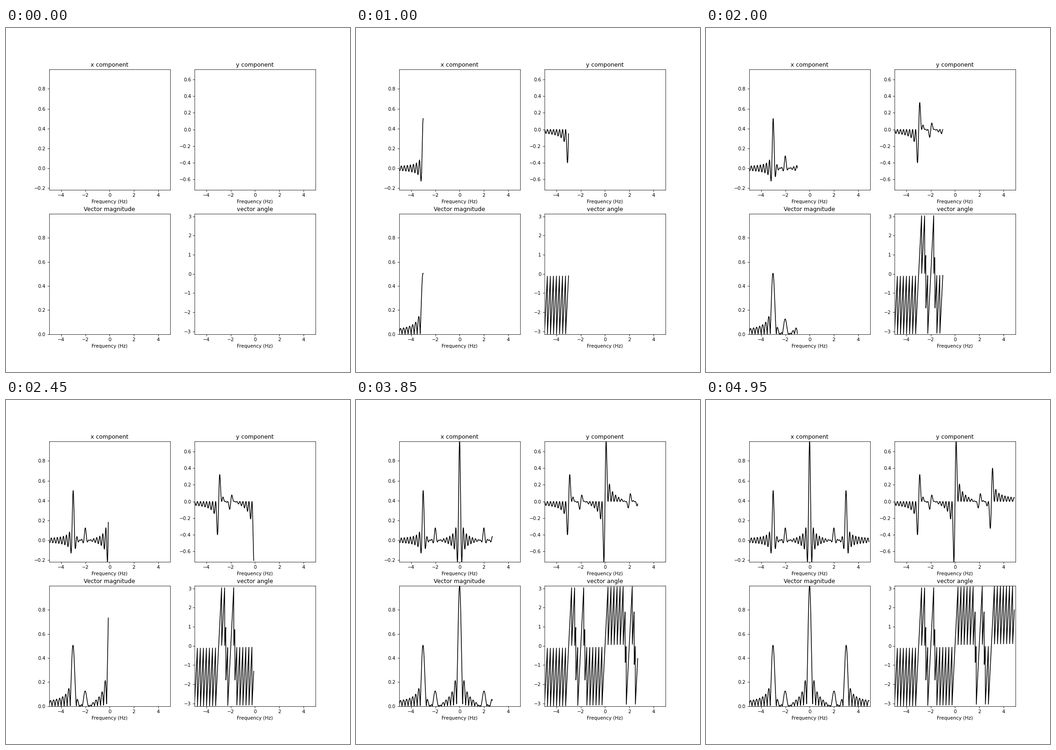
A matplotlib script for the animation above (5000 ms loop, 748 px wide and 748 px high).

```python
import numpy as np
import matplotlib.pyplot as plt
from matplotlib.animation import FuncAnimation

FRAMES = 100
STEP = 10            # samples revealed per frame
DURATION = 4         # length of the signal in seconds
RATE = 4000          # samples per second

freqs = np.linspace(-5, 5, FRAMES * STEP)


def winding(f):
    """Mean of exp(2j*pi*f*t) over the sampled duration."""
    turn = np.exp(2j * np.pi * f * DURATION) - 1
    return turn / (DURATION * RATE * (np.exp(2j * np.pi * f / RATE) - 1))


def cosine(f, f0):
    return (winding(f - f0) + winding(f + f0)) / 2


# centre of mass of 1 + cos(3 Hz) + cos(2 Hz) / 4 wound at every frequency
centre = winding(freqs) + cosine(freqs, 3) + cosine(freqs, 2) / 4
angle = np.angle(centre)
angle[0] = -np.pi    # the vector vanishes at the first frequency


def span(values):
    return values.min(), values.max()


size = np.abs(centre)
panels = [
    ("x component", centre.real, span(centre.real)),
    ("y component", centre.imag, span(centre.imag)),
    ("Vector magnitude", size, (0, size.max())),
    ("vector angle", angle, (-np.pi, np.pi)),
]

fig, axes = plt.subplots(2, 2, figsize=(10, 10), dpi=74.8)
lines = []
for ax, (title, values, limits) in zip(axes.flat, panels):
    ax.set(title=title, xlabel="Frequency (Hz)", xlim=(-5, 5), ylim=limits)
    lines.append(ax.plot([], [], "k")[0])


def update(frame):
    n = frame * STEP
    for line, (_, values, _) in zip(lines, panels):
        line.set_data(freqs[:n], values[:n])
    return lines


anim = FuncAnimation(fig, update, frames=FRAMES, interval=50, repeat=True)
plt.show()
```
